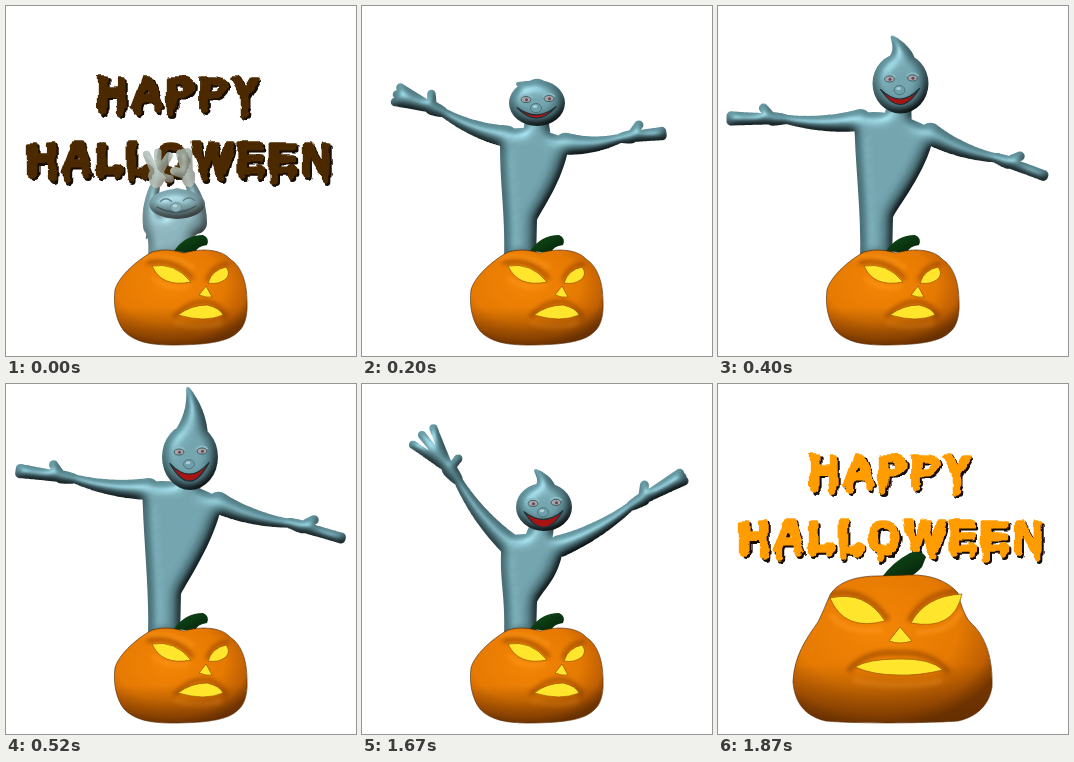
An HTML page for the animation above (3.87 s loop, 350 by 350 pixels).

```html
<!DOCTYPE html>
<html lang="en">
<head>
<meta charset="utf-8">
<title>Happy Halloween</title>
<style>
html, body { margin: 0; width: 100%; height: 100%; overflow: hidden; background: #fff; }
svg { display: block; width: 100vw; height: 100vh; }
text { font: bold 43px "Liberation Sans", Arial, sans-serif; letter-spacing: 3.5px; text-anchor: middle; }
.letters { fill: currentColor; stroke: currentColor; stroke-width: 3.6; stroke-linejoin: round; stroke-linecap: round; }
.drips { stroke-width: 7.5; }
.glow { fill: #ffe62c; stroke: #9a4e00; stroke-width: .7; stroke-linejoin: round; }
.dark { fill: none; stroke: #7c3500; opacity: .55; filter: url(#soft); }
.light { fill: none; stroke: #ff9a20; opacity: .6; filter: url(#soft); }
</style>
</head>
<body>
<svg viewBox="0 0 350 350">
  <defs>
    <radialGradient id="skin" cx=".42" cy=".36" r=".68">
      <stop offset="0" stop-color="#f48606"/>
      <stop offset=".6" stop-color="#e67a02"/>
      <stop offset=".85" stop-color="#c06002"/>
      <stop offset="1" stop-color="#7a3a00"/>
    </radialGradient>
    <linearGradient id="shade" x2="0" y2="1">
      <stop offset=".6" stop-color="#5a2800" stop-opacity="0"/>
      <stop offset="1" stop-color="#5a2800" stop-opacity=".65"/>
    </linearGradient>
    <linearGradient id="leaf" x2="1" y2="1">
      <stop offset="0" stop-color="#12501a"/>
      <stop offset="1" stop-color="#042008"/>
    </linearGradient>
    <filter id="soft" x="-40%" y="-80%" width="180%" height="260%"><feGaussianBlur stdDeviation="2.2"/></filter>
    <filter id="ooze" x="-5%" y="-10%" width="110%" height="120%">
      <feTurbulence type="fractalNoise" baseFrequency=".07" numOctaves="1" seed="4"/>
      <feDisplacementMap in="SourceGraphic" scale="9" xChannelSelector="R" yChannelSelector="G"/>
    </filter>
    <filter id="clay" filterUnits="userSpaceOnUse" x="0" y="0" width="350" height="350" color-interpolation-filters="sRGB">
      <feGaussianBlur in="SourceAlpha" stdDeviation="3" result="fine"/>
      <feGaussianBlur in="SourceAlpha" stdDeviation="7" result="broad"/>
      <feComposite in="fine" in2="broad" operator="arithmetic" k2=".4" k3=".6" result="bump"/>
      <feDiffuseLighting in="bump" surfaceScale="8" lighting-color="#6ca1ac" result="base">
        <feDistantLight azimuth="245" elevation="60"/>
      </feDiffuseLighting>
      <feSpecularLighting in="bump" surfaceScale="8" specularConstant=".3" specularExponent="30" lighting-color="#d8f4fa" result="shine">
        <feDistantLight azimuth="245" elevation="60"/>
      </feSpecularLighting>
      <feComposite in="base" in2="shine" operator="arithmetic" k2="1" k3="1"/>
      <feGaussianBlur stdDeviation="1"/>
      <feComposite in2="SourceAlpha" operator="in"/>
    </filter>
  </defs>
  <g id="title" filter="url(#ooze)"></g>
  <g id="ghost"></g>
  <g id="small"></g>
  <g id="big"></g>
</svg>
<script>
const $ = id => document.getElementById(id);

// Lettering: two drips under each letter, placed by fraction of its width.
const feet = { P: [.2], Y: [.5], O: [.4, .6], W: [.3, .7] };

function buildTitle() {
  const word = (text, x, y) => `<text x="${x}" y="${y}">${text}</text>`;
  const title = $("title");
  title.innerHTML = word("HAPPY", 173.5, 101) + word("HALLOWEEN", 175, 167);
  let drips = "", seed = 7;
  for (const node of title.children) {
    [...node.textContent].forEach((ch, i) => {
      const a = node.getStartPositionOfChar(i), b = node.getEndPositionOfChar(i);
      const width = b.x - a.x - 3.5;
      for (const f of feet[ch] || [.2, .8]) {
        seed = seed * 137 % 251;
        drips += `M${a.x + width * f} ${a.y - 5}v${6 + seed % 7}`;
      }
    });
  }
  const body = `${title.innerHTML}<path class="drips" d="${drips}"/>`;
  title.innerHTML =
    `<g class="letters" color="#120900" transform="translate(2 2.2)" aria-hidden="true">${body}</g>
     <g class="letters">${body}</g>`;
}

function buildPumpkin(id, { outline, stem, face, dark, light, line }) {
  $(id).innerHTML = `<clipPath id="${id}Clip"><path d="${outline}"/></clipPath>
    <path d="${stem}" fill="url(#leaf)"/>
    <g clip-path="url(#${id}Clip)">
      <path d="${outline}" fill="url(#skin)"/>
      <path class="dark" stroke-width="${line}" d="${dark}"/>
      <path class="light" stroke-width="${line}" d="${light}"/>
      <path d="${outline}" fill="url(#shade)"/>
    </g>
    <path d="${outline}" fill="none" stroke="#5c2b00" stroke-width=".7"/>
    <path class="glow" d="${face}"/>`;
}

buildTitle();
buildPumpkin("small", {
  outline: "M146 246C160 242 170 245 178 247C195 242 215 243 224 253C235 260 241 275 241 296C242 312 237 322 233 325C224 335 205 339 165 339C145 339 128 336 118 325C110 315 107 298 109 284C112 272 128 256 146 246Z",
  stem: "M168 245Q179 229 197 229Q204 232 201 239Q191 240 189 247Z",
  face: "M146 260Q169 256 185 276Q156 282 146 260ZM202 277Q206 264 220 261Q225 267 220 273Q212 279 202 277ZM200 280L193 289Q200 292 206 291ZM172 309Q185 299 201 299Q214 302 217 309Q199 317 172 309Z",
  dark: "M141 257Q167 250 187 273M201 275Q207 258 223 258M168 311Q185 293 203 296Q217 301 220 312",
  light: "M135 252Q163 245 188 262M146 272Q162 285 184 280M168 316Q190 325 216 317",
  line: 4
});
buildPumpkin("big", {
  outline: "M112 211C120 197 140 192 160 192L190 191C212 190 230 197 240 209C243 222 247 232 252 238C268 252 275 275 274 303C271 322 258 333 240 337C215 339 140 340 108 337C90 333 77 322 75 298C76 272 88 255 100 238C105 228 108 220 112 211Z",
  stem: "M164 193Q175 178 192 169Q203 165 208 173L204 183Q197 191 189 194Z",
  face: "M112 214Q147 206 167 237Q126 248 112 214ZM193 239Q207 212 244 210Q236 247 193 239ZM182 243L171 257Q182 261 194 257ZM137 283Q150 275 180 275Q212 274 225 286Q200 292 180 291Q155 291 137 283Z",
  dark: "M108 211Q146 201 170 236M191 237Q207 206 247 207M130 287Q148 266 180 269Q214 267 231 289",
  light: "M112 230Q128 251 164 246M198 248Q232 250 244 226M135 296Q180 306 224 297",
  line: 5
});

// A pose is a few key points; the limbs and the face follow from them.
const pose = (chestY, span, hx, hy, ry, horn, left, right, fan, grin) =>
  ({ chest: [chestY, span], head: [hx, hy, ry], horn, left, right, mood: [fan, grin] });
const crouch = pose(214, 26, 171, 198, 15, [165, 187], [152, 146], [178, 147], .5, 2);
const rise = pose(132, 29, 169, 112, 19, [145, 98], [58, 39], [284, 70], .35, 5);
const spread = pose(117, 40, 181, 82, 27, [167, 58], [12, 138], [316, 185], .06, 8);
const tall = pose(99, 40, 184, 73, 33, [182, 5], [14, 87], [335, 154], .06, 14);
const laugh = { ...tall, chest: [103, 40], head: [184, 77, 32], horn: [179, 16], mood: [.06, 22] };
const sink = pose(153, 31, 182, 123, 24, [174, 87], [60, 51], [320, 93], .3, 16);

const blend = (a, b, t) => a + (b - a) * t;
const mix = (a, b, t) => Object.fromEntries(
  Object.keys(a).map(k => [k, a[k].map((v, i) => blend(v, b[k][i], t))]));

const disc = (x, y, r) => `M${x - r} ${y}a${r} ${r} 0 1 1 ${2 * r} 0a${r} ${r} 0 1 1 ${-2 * r} 0`;

// Tapered quadratic curve, made of overlapping discs.
function limb(x0, y0, cx, cy, x1, y1, r0, r1) {
  const n = 40;
  let d = "";
  for (let i = 0; i <= n; i++) {
    const t = i / n;
    d += disc(blend(blend(x0, cx, t), blend(cx, x1, t), t), blend(blend(y0, cy, t), blend(cy, y1, t), t), blend(r0, r1, t));
  }
  return d;
}
const bone = (x0, y0, x1, y1, r0, r1) => limb(x0, y0, x0, y0, x1, y1, r0, r1);

// side is -1 for the arm on the left of the stage and 1 for the right.
function arm(sx, sy, [tx, ty], fan, side) {
  const at = t => [blend(sx, tx, t), blend(sy, ty, t)];
  const angle = Math.atan2(ty - sy, tx - sx), reach = Math.hypot(tx - sx, ty - sy) * .32;
  const [wx, wy] = at(.58), [px, py] = at(.68), [mx, my] = at(.29);
  const bend = angle + side * Math.PI / 2;
  const finger = (turn, length, r) =>
    bone(px, py, px + Math.cos(angle + turn) * length, py + Math.sin(angle + turn) * length, r + 1, r);
  const r = 4.8 - fan * 2.5;
  return {
    sleeve: limb(sx, sy, mx + 7 * Math.cos(bend), my + 7 * Math.sin(bend), wx, wy, 11, 4.5),
    hand: bone(wx, wy, px, py, 4.5, 6.5 + fan * 4) + [-fan, 0, fan].map(a => finger(a, reach, r)).join("") +
      finger(-side * (.75 + fan * 2), 14, r)
  };
}

function torso(lx, ly, rx, ry) {
  const waist = 195 + ly * .15;
  return `M${lx} ${ly}Q${(lx + rx) / 2} ${ly - 8} ${rx} ${ry}C${rx - 4} ${ry + 35} 183 ${waist - 15} 175 ${waist}` +
    `L174 256H142C144 205 136 ${ly + 45} ${lx} ${ly}Z`;
}

const eye = (x, y) => `<ellipse cx="${x}" cy="${y}" rx="4.8" ry="3" fill="#a9a3a8" stroke="#38585f" stroke-width=".9"/>
  <circle cx="${x + .5}" cy="${y + .3}" r="1.5" fill="#604b50"/>
  <path d="M${x - 6} ${y - 2}q6 -6 12 0" fill="none" stroke="#8dbac3" stroke-width="1.6"/>`;
const lid = (x, y) => `<path d="M${x - 6} ${y}q6 -6 12 0" fill="none" stroke="#3f6771" stroke-width="1.4"/>`;

function face(hx, hy, ry, grin, sleepy) {
  const look = sleepy ? lid : eye;
  const eyeY = hy - ry * .15, noseY = hy + ry * .22, lipY = hy + ry * .2, curl = ry * .65;
  return look(hx - 11, eyeY) + look(hx + 12, eyeY - 1) +
    `<path d="M${hx - 20} ${lipY}q20 ${curl} 39 -1q-19 ${curl + grin + 1} -39 1Z" fill="${sleepy ? "#3f6771" : "#a81414"}" stroke="#1d3238" stroke-width="1.2" stroke-linejoin="round"/>
    <ellipse cx="${hx - 1}" cy="${noseY}" rx="5.5" ry="4.6" fill="#6f9faa" stroke="#3f636b" stroke-width=".7"/>
    <ellipse cx="${hx - 2}" cy="${noseY - 1.6}" rx="2.4" ry="1.5" fill="#a9ced5"/>`;
}

function ghost(p, faded) {
  const [chestY, span] = p.chest, [hx, hy, ry] = p.head, [fan, grin] = p.mood, [tipX, tipY] = p.horn;
  const mid = 168 + (span - 26) * .6, lx = mid - span, rx = mid + span;
  const rightY = chestY + (span - 26) * 1.2;
  const left = arm(lx + 6, chestY + 6, p.left, fan, -1);
  const right = arm(rx - 4, rightY + 3, p.right, fan / 3, 1);
  const neck = bone(mid + 1, chestY + 20, hx, hy + ry * .5, 20, 11);
  const skull = `M${hx - 28} ${hy}a28 ${ry} 0 1 1 56 0a28 ${ry} 0 1 1 -56 0`;
  const baseY = hy - ry * .5;
  const horn = limb(hx, baseY, (hx + tipX) / 2 + 9, (baseY + tipY) / 2, tipX, tipY, ry * .55, 2);
  const clay = d => `<path d="${d}" filter="url(#clay)"/>`;
  const hands = left.hand + right.hand;
  return `<g opacity="${faded ? .82 : 1}">
    ${clay(torso(lx, chestY, rx, rightY) + neck + left.sleeve + right.sleeve + hands)}
    ${faded ? `<path d="${hands}" fill="#ead9bf" opacity=".5"/>` : ""}
    ${clay(skull + horn)}
    ${face(hx, hy, ry, grin, faded)}
  </g>`;
}

const brown = "#4c2900", orange = "#ff9c04";
const steps = [
  { at: 0, pose: crouch, title: brown },
  { at: 100, pose: rise },
  { at: 200, pose: mix(rise, spread, .5) },
  { at: 300, pose: spread },
  { at: 400, pose: mix(spread, tall, .5) },
  { at: 520, pose: tall },
  { at: 670, pose: laugh },
  { at: 1670, pose: sink },
  { at: 1770, pose: crouch, title: brown },
  { at: 1870, title: orange }
];
const loop = 3870;
let shown = null;

const show = (id, on) => { $(id).style.display = on ? "" : "none"; };

function draw(time) {
  const step = steps.findLast(s => s.at <= time);
  if (step === shown) return;
  shown = step;
  $("title").style.color = step.title || "";
  $("ghost").innerHTML = step.pose ? ghost(step.pose, step.pose === crouch) : "";
  show("title", step.title);
  show("small", step.pose);
  show("big", !step.pose);
}

const start = performance.now();
function tick() {
  draw((performance.now() - start) % loop);
  requestAnimationFrame(tick);
}
tick();
</script>
</body>
</html>
```
